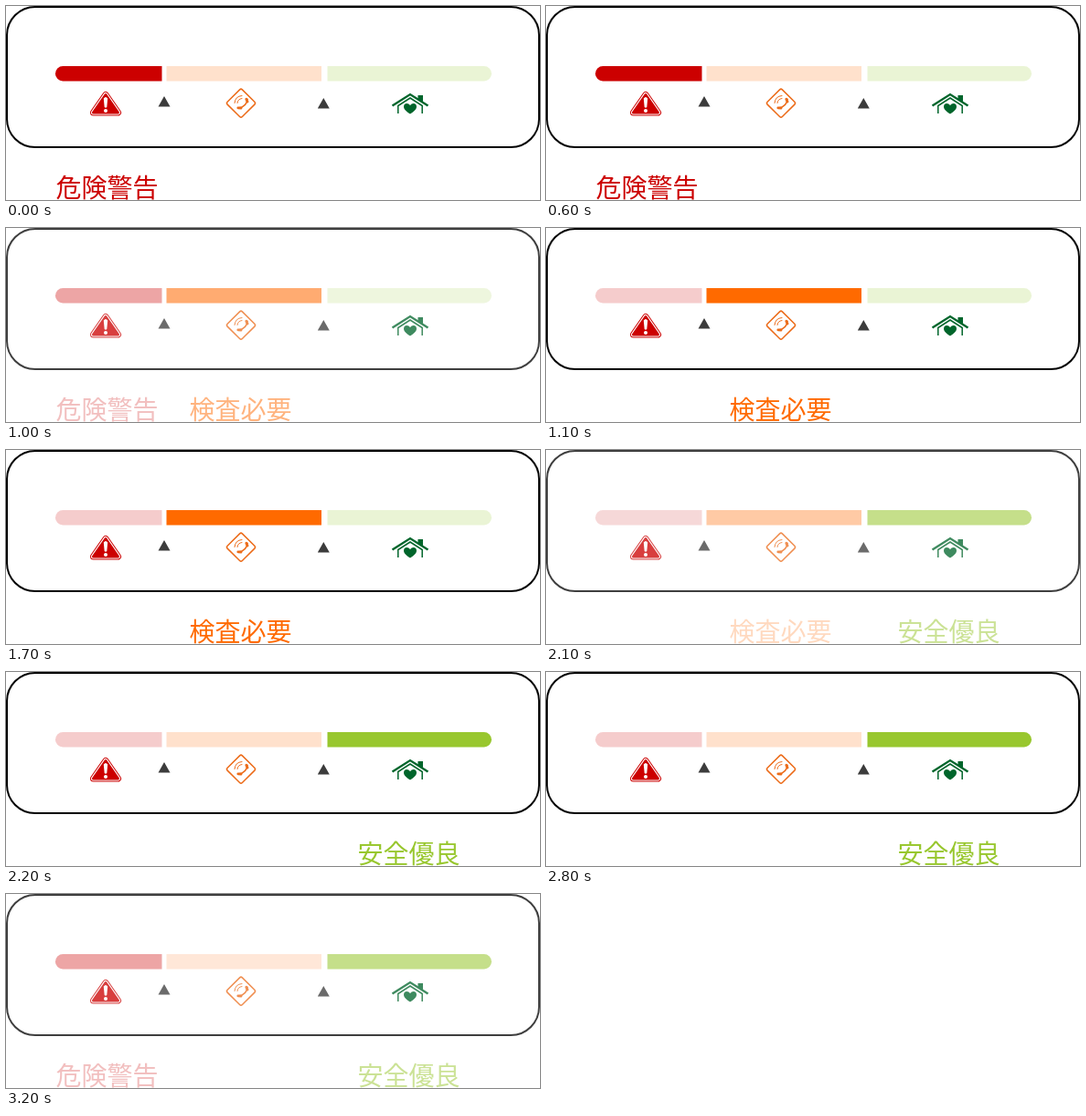
Animation of 584 by 213 pixels, one loop 3300 ms. Source, as an HTML page:

```html
<!DOCTYPE html>
<html lang="ja">
<head>
<meta charset="utf-8">
<style>
  html, body { margin: 0; width: 100%; height: 100%; overflow: hidden; background: #fff; }
  svg { display: block; }
  text { font: 500 28px "Noto Sans CJK JP", "Noto Sans CJK", sans-serif; }
</style>
</head>
<body>
<svg width="584" height="213" viewBox="0 0 584 213">
  <defs>
    <g id="base">
      <rect width="584" height="213" fill="#fff"/>
      <rect x="1" y="1" width="582" height="154" rx="31" fill="none" stroke="#000" stroke-width="2"/>
      <path d="M173 99l6.5 11.5h-13zM347.3 101l6.5 11.5h-13z" fill="#3c3c3c"/>

      <g stroke-linejoin="round">
        <path d="M109 97.5L122.5 117h-27z" fill="#c00" stroke="#c00" stroke-width="7"/>
        <path d="M109 97.5L122.5 117h-27z" fill="#c00" stroke="#fff" stroke-width="5"/>
        <path d="M109 97.5L122.5 117h-27z" fill="#c00" stroke="#c00" stroke-width="3"/>
        <path d="M106.8 101.5q2.2-3 4.4 0l-.9 9.5q-1.300 1.500-2.600 0z" fill="#fff"/>
        <circle cx="109" cy="115" r="2" fill="#fff"/>
      </g>

      <g fill="none" stroke="#ec6c1a" stroke-linecap="round">
        <rect x="-11.500" y="-11.500" width="23" height="23" rx="2" stroke-width="1.500" transform="translate(257 106.700) rotate(45)"/>
        <path d="M264 102.500q-1 8-9.500 9.500" stroke-width="1.800"/>
        <path d="M262.800 102.300l1.300 2.700M253.800 111.800l3.200 .3" stroke-width="2.800"/>
        <path d="M250 106.500q.5-7.500 8-8M253 106.500q.5-4.500 5-5" stroke-width="1"/>
      </g>

      <g fill="#00652b">
        <path d="M450.500 98h5.500v8l-5.500-4z"/>
        <path d="M422.500 109.500L442 97l19.500 12.500" fill="none" stroke="#00652b" stroke-width="2.300"/>
        <path d="M428.800 118v-8.500L442 101l13.200 8.500v8.500" fill="none" stroke="#00652b" stroke-width="1.500"/>
        <path d="M442 118.500c-3-2-7-4.500-7-8 0-4 5-4.500 7-1.300 2-3.200 7-2.700 7 1.300 0 3.500-4 6-7 8z"/>
      </g>
    </g>
  </defs>
</svg>
<script>
const STEP = 1100, HOLD = 1000;
const levels = [
  { label: "危険警告", x: 54.5, color: "#c00", bar: "M170.500 66H62.200a8.200 8.200 0 0 0 0 16.500h108.300z" },
  { label: "検査必要", x: 200.5, color: "#ff6a00", bar: "M175.500 66H345v16.500H175.500z" },
  { label: "安全優良", x: 384.5, color: "#98c72e", bar: "M351.500 66h171.300a8.200 8.200 0 0 1 0 16.500H351.500z" },
];

const bars = active => levels.map(({ bar, color }, i) =>
  `<path d="${bar}" fill="${color}" fill-opacity="${i === active ? 1 : 0.2}"/>`).join("");

const svg = document.querySelector("svg");
svg.insertAdjacentHTML("beforeend", levels.map(({ label, x, color }, i) =>
  `<g class="layer"><use href="#base"/>${bars(i)}<text x="${x}" y="210" fill="${color}">${label}</text></g>`).join(""));
const layers = [...svg.querySelectorAll(".layer")];

function draw(now) {
  const t = now % (STEP * levels.length);
  const active = Math.floor(t / STEP);
  const next = (active + 1) % levels.length;
  const blending = t % STEP >= HOLD;
  layers.forEach((layer, i) => {
    layer.style.opacity = blending ? (i === active || i === next ? 0.5 : 0) : +(i === active);
  });
}

const start = performance.now();
function tick() {
  draw(performance.now() - start);
  requestAnimationFrame(tick);
}
tick();
</script>
</body>
</html>
```
